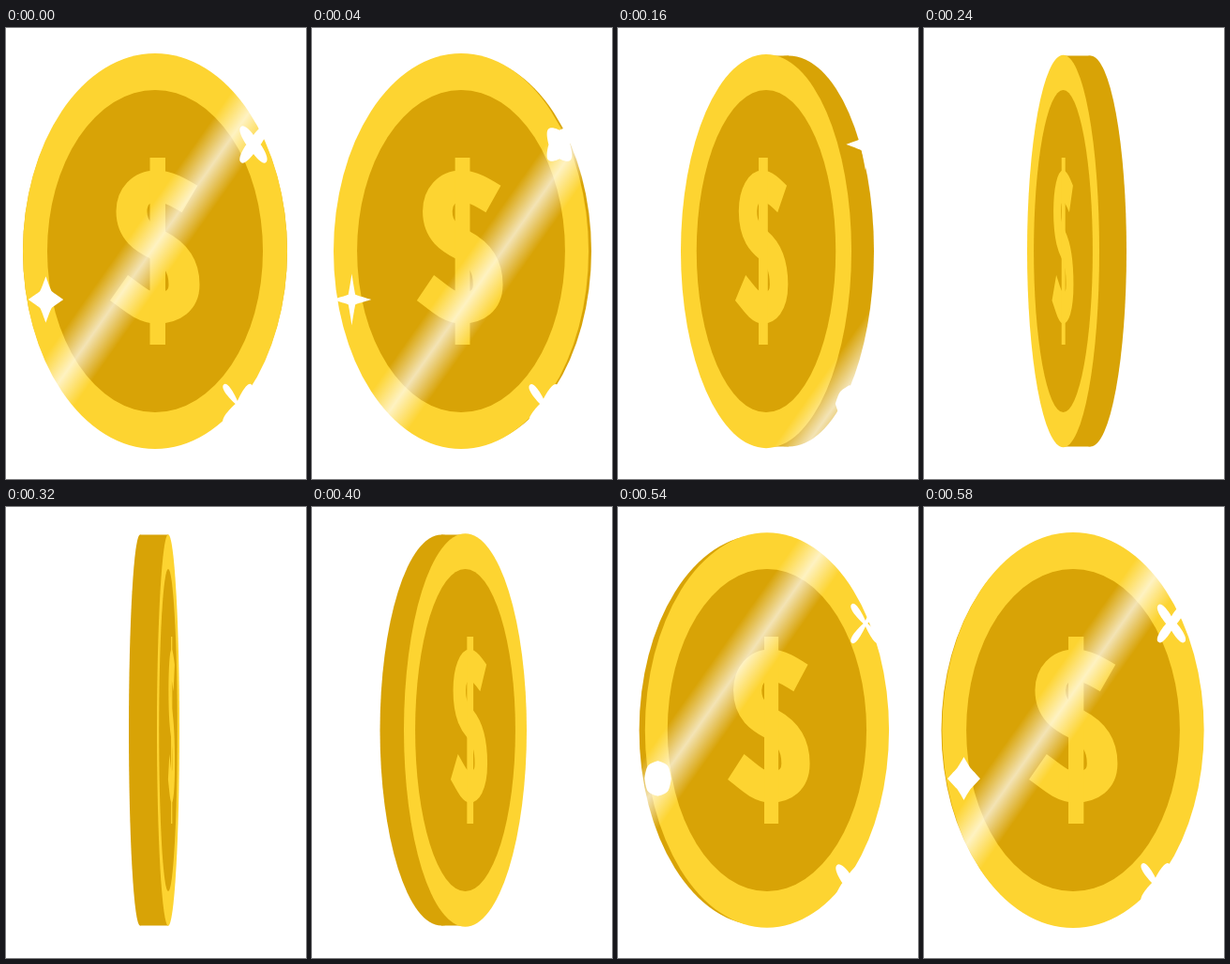
An HTML page with a canvas that plays this animation: 320 px wide and 480 px high, repeating every 0.6 s.

```html
<!DOCTYPE html>
<html lang="en">
<head>
<meta charset="utf-8">
<title>Spinning coin</title>
<style>
  html, body { margin: 0; height: 100%; overflow: hidden; background: #fff; }
  canvas { display: block; }
</style>
</head>
<body>
<canvas id="stage" width="320" height="480"></canvas>
<script>
const ctx = document.getElementById('stage').getContext('2d');
const LOOP = 600, STEP = 20, MID_X = 159, MID_Y = 237.5;
const GOLD = '#fdd431', DARK = '#d8a306';

// Poses every 40 ms of a quarter turn:
// face radius, face shift, thickness, dollar scale, dollar shift
const POSES = [
  [141, 0, 0, 1, 0],
  [136, 0, 3, 0.96, -1.2],
  [123, 0, 10, 0.863, -2.5],
  [108, -1, 18, 0.747, -4],
  [91, -1, 24, 0.59, -6.8],
  [65.5, -4.5, 25.5, 0.41, -7],
  [38.5, -10.5, 29, 0.24, -13],
  [12, -14, 30, 0.075, -15],
  [-14, -16, 30, -0.09, -16]
];

const SPARKLES = [
  { x: 264, y: 124, peak: 230 },
  { x: 42.5, y: 289, peak: 100 },
  { x: 247, y: 400, peak: 310 }
];

const DOLLAR = new Path2D(`M196 182C184 175 172 168 161 168C144 168 134 180 134 195
  C134 216 148 224 162 231C180 240 190 252 190 273C190 290 178 298 161 298
  C146 298 134 286 120.5 276.5`);

function poseAt(u) {
  const i = Math.floor(u / 40), f = u / 40 - i;
  const row = k => POSES[Math.min(Math.abs(k), POSES.length - 1)];
  return POSES[0].map((_, c) => {
    const [a, b, d, e] = [-1, 0, 1, 2].map(k => row(i + k)[c]);
    return b + f / 2 * (d - a + f * (2 * a - 5 * b + 4 * d - e + f * (3 * (b - d) + e - a)));
  });
}

function ellipse(x, rx, ry, color) {
  ctx.fillStyle = color;
  ctx.beginPath();
  ctx.ellipse(x, MID_Y, rx, ry, 0, 0, 2 * Math.PI);
  ctx.fill();
}

function drawCoin(t) {
  const firstHalf = t < LOOP / 2, side = firstHalf ? 1 : -1;
  const [r, shift, depth, scale, dollarShift] = poseAt(firstHalf ? t : LOOP - t);
  const rx = Math.max(r, 0);
  const front = MID_X + side * shift, back = front + side * depth;

  ellipse(back, rx, 208, DARK);
  ctx.fillRect(Math.min(front, back), MID_Y - 208, depth, 416);
  ellipse(front, rx, 208 + rx / 56, GOLD);
  ellipse(front, rx * 0.8156, 171.5, DARK);

  ctx.save();
  ctx.translate(161.7 + side * dollarShift, 0);
  ctx.scale(Math.max(scale, 0.001), 1);
  ctx.translate(-161.7, 0);
  ctx.strokeStyle = ctx.fillStyle = GOLD;
  ctx.lineWidth = 33;
  ctx.stroke(DOLLAR);
  ctx.fillRect(153.5, 138, 16.5, 199);
  ctx.restore();
}

function drawShine(t) {
  const time = t < LOOP / 2 ? t : t - LOOP;
  ctx.save();
  ctx.translate(155 + 1.2 * time, MID_Y);
  ctx.rotate(0.615);
  const glow = ctx.createLinearGradient(-28, 0, 28, 0);
  glow.addColorStop(0, 'rgba(255,255,255,0)');
  glow.addColorStop(0.5, 'rgba(255,255,255,.7)');
  glow.addColorStop(1, 'rgba(255,255,255,0)');
  ctx.fillStyle = glow;
  ctx.fillRect(-28, -400, 56, 800);
  ctx.restore();
}

// Morphs between an upright star (plus = 1) and a cross of petals (plus = 0)
function drawSparkle({ x, y, peak }, t) {
  const plus = (1 + Math.cos(2 * Math.PI * (t - peak) / LOOP)) / 2;
  const tip = 0.08 + 0.92 * plus ** 0.6, petal = 0.08 + 0.92 * (1 - plus) ** 0.7;
  const round = 7 * (1 - plus);
  const point = (angle, size, w, h) =>
    [x + w * size * Math.cos(angle), y + h * size * Math.sin(angle)];
  ctx.fillStyle = '#fff';
  ctx.beginPath();
  ctx.moveTo(...point(0, tip, 22, 29));
  for (let k = 0; k < 4; k++) {
    const a = k * Math.PI / 2, mid = a + Math.PI / 4;
    const start = point(a, tip, 22, 29), end = point(a + Math.PI / 2, tip, 22, 29);
    const [qx, qy] = point(mid, petal, 21, 29);
    const tx = -Math.sin(mid) * round, ty = Math.cos(mid) * round;
    ctx.bezierCurveTo(...start, qx - tx, qy - ty, qx, qy);
    ctx.bezierCurveTo(qx + tx, qy + ty, ...end, ...end);
  }
  ctx.fill();
}

function draw() {
  const t = Math.floor(performance.now() % LOOP / STEP) * STEP;
  ctx.fillStyle = '#fff';
  ctx.fillRect(0, 0, 320, 480);
  drawCoin(t);
  drawShine(t);
  SPARKLES.forEach(s => drawSparkle(s, t));
  requestAnimationFrame(draw);
}
draw();
</script>
</body>
</html>
```
